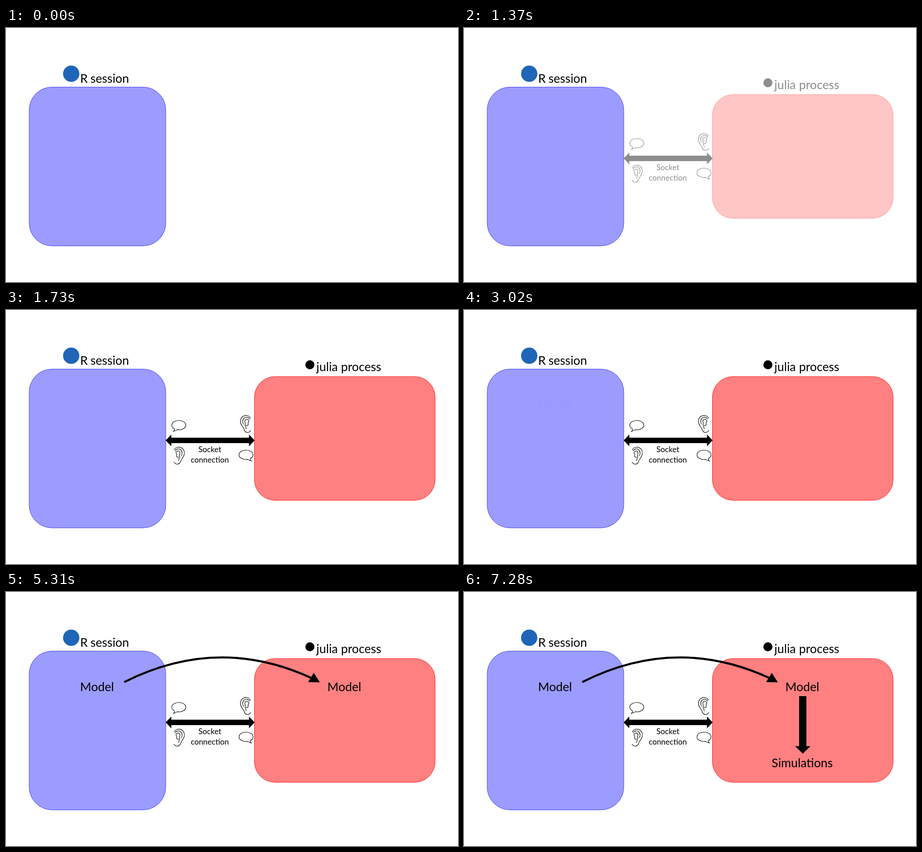
Write an HTML page that moves like this. It is 998 px wide and 561 px high and loops after 8000 ms.

```html
<!DOCTYPE html>
<html lang="en">
<head>
<meta charset="utf-8">
<title>Session and process</title>
<style>
  html, body { margin: 0; width: 100%; height: 100%; overflow: hidden; background: #fff; }
  svg { display: block; width: 100%; height: 100%; }
  text { font: 26.7px Lato, "Open Sans", sans-serif; text-anchor: middle; }
  .small { font-size: 17.2px; }
  .line { fill: none; stroke: #000; stroke-width: 1.15; stroke-linecap: round; }
</style>
</head>
<body>
<svg viewBox="0 0 998 561">
  <defs>
    <path id="bubble" class="line" d="M-12.5 13.5Q-9 11-10 8A15.5 10.3 0 1 1-4 9.9Q-8 13-12.5 13.5Z"/>
    <g id="ear" class="line">
      <path d="M23 7C20 1 13-.5 8 2C2 4.5-.5 11 1 17C2.5 23 6 26 8 30C9.5 35 12 39 17 38.5C20 38 22 36.5 23.5 34"/>
      <path d="M21 9C18 4 12 3.5 8.5 7C5 11 5 16 7.5 20"/>
      <path d="M19 12C16 8 11 9 10.5 13C10 16 12 17.5 11 21C10.5 25 14 26 13 31"/>
      <path d="M19 12C20 15 17 16 17.5 18.5C19 20.5 17 24 13.5 23"/>
    </g>
  </defs>

  <circle cx="144" cy="101" r="18" fill="#1f66b8"/>
  <text x="172" y="121">R</text>
  <text x="229" y="121">session</text>
  <rect x="51.2" y="130.5" width="301.6" height="350.7" rx="50.3" fill="#9c9cff" stroke="#3c3cf5"/>

  <g id="link">
    <circle cx="671" cy="121" r="10"/>
    <text x="709" y="135">julia</text>
    <text x="784.2" y="135">process</text>
    <rect x="548.5" y="147" width="399" height="273.3" rx="45.5" fill="#ff8080" stroke="#ff1c1c"/>
    <path d="M352.500 288L365 275V282H536.500V275L549 288L536.500 301V294H365V301Z"/>
    <text class="small" x="450" y="314.200">Socket</text>
    <text class="small" x="450" y="336.800">connection</text>
    <use href="#bubble" x="382" y="254.500"/>
    <use href="#bubble" transform="translate(529.5 320) scale(-1 1)"/>
    <use href="#ear" x="517" y="232"/>
    <use href="#ear" transform="translate(394.500 302) scale(-1 1)"/>
  </g>

  <text id="model" x="201" y="218.700">Model</text>

  <g id="send">
    <path d="M261 199Q468.400 94.400 675.700 190.600" fill="none" stroke="#000" stroke-width="4.600"/>
    <path d="M693 199.500L679.500 178.500L667 199Z"/>
    <text x="747" y="218.700">Model</text>
  </g>

  <g id="run">
    <path d="M740 230H756V340.500H765L748 357L731 340.500H740Z"/>
    <text x="746.800" y="386.500">Simulations</text>
  </g>
</svg>
<script>
  const LOOP = 8000, STEP = 40;
  const fades = [["link", 1170], ["model", 3020], ["send", 4790], ["run", 6640]]
    .map(([id, start]) => ({ node: document.getElementById(id), start }));

  // Opacity rises in even steps, starting faintly visible.
  function fade(t, start) {
    if (t < start) return 0;
    return Math.min(1, 0.02 + 0.085 * Math.floor((t - start) / STEP));
  }

  function draw(t) {
    for (const { node, start } of fades) node.setAttribute("opacity", fade(t, start));
  }

  const begin = performance.now();
  function tick() {
    draw((performance.now() - begin) % LOOP);
    requestAnimationFrame(tick);
  }
  tick();
</script>
</body>
</html>
```
